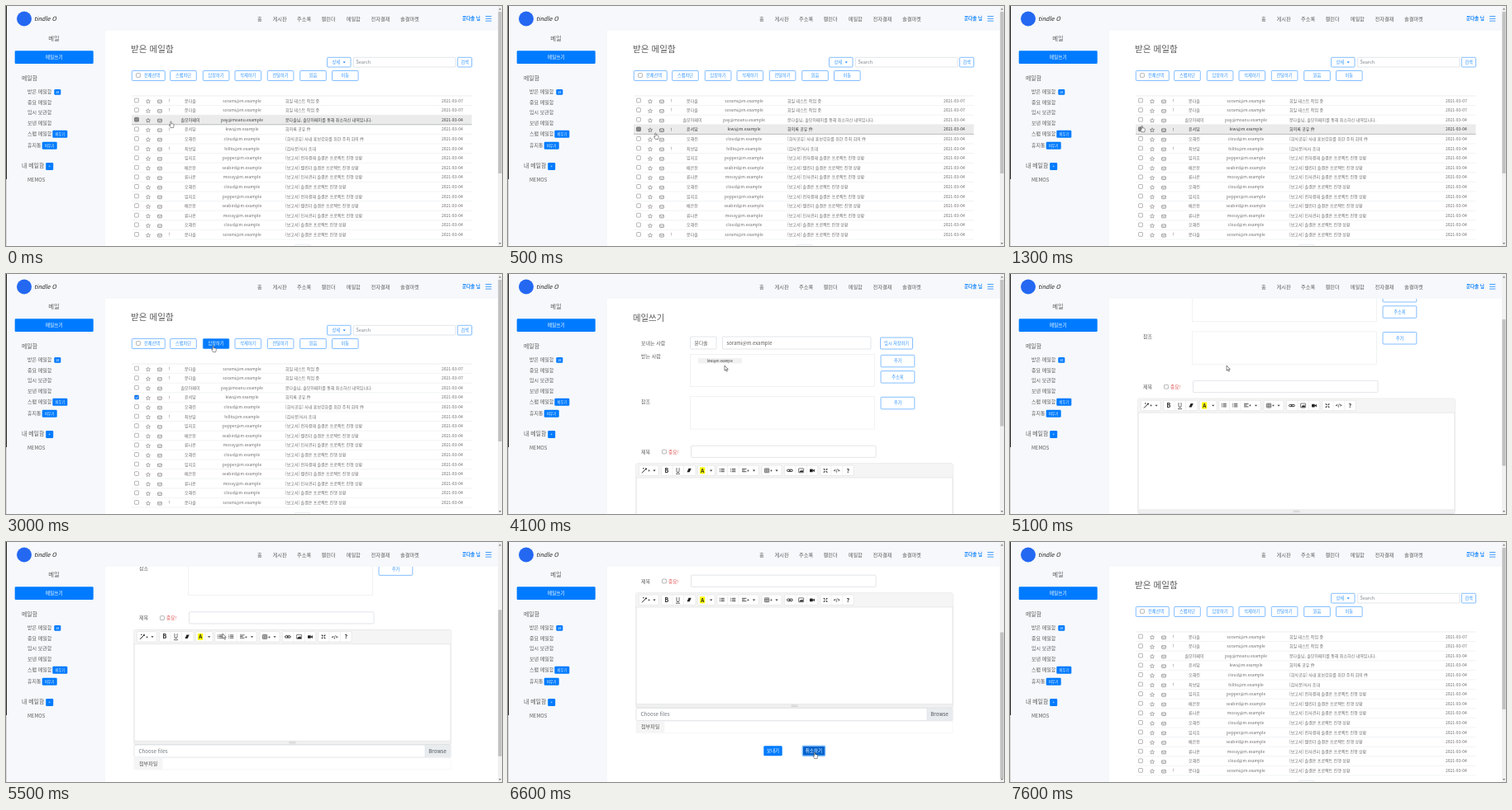
An HTML page for the animation above (7700 ms loop, 600 by 291 pixels).

```html
<!DOCTYPE html>
<html lang="ko">
<head>
<meta charset="utf-8">
<title>메일함</title>
<style>
html, body { margin: 0; width: 100%; height: 100%; overflow: hidden; background: #fff; }
svg { display: block; width: 100%; height: 100%; }
text { font-family: "Noto Sans CJK KR", "Noto Sans CJK", "Noto Sans", sans-serif; white-space: pre; }
</style>
</head>
<body>
<svg id="stage" viewBox="0 0 600 291" xmlns="http://www.w3.org/2000/svg"></svg>
<script>
const BLUE = '#007bff', SOFT_BLUE = '#2f93ff', INK = '#5c5c5c', ROW_INK = '#707070', PALE = '#f6f8fb';
const LOOP = 7700, STEP = 100;
const ROW_TOP = 109, ROW_H = 11.6;

// Drawing helpers; text is placed by its vertical centre.
const rect = (x, y, w, h, fill, extra = '') =>
  `<rect x="${x}" y="${y}" width="${w}" height="${h}" fill="${fill}" ${extra}/>`;
const frame = (x, y, w, h, stroke, fill = '#fff', r = 1.2) =>
  rect(x, y, w, h, fill, `stroke="${stroke}" stroke-width=".6" rx="${r}"`);
const text = (x, y, size, str, fill = INK, extra = '') =>
  `<text x="${x}" y="${y + size * 0.36}" font-size="${size}" fill="${fill}" ${extra}>${str}</text>`;
const mid = (x, y, size, str, fill = INK, extra = '') =>
  text(x, y, size, str, fill, `text-anchor="middle" ${extra}`);
const line = (d, stroke = '#333', w = 0.7, extra = '') =>
  `<path d="${d}" fill="none" stroke="${stroke}" stroke-width="${w}" ${extra}/>`;
const caret = (x, y, fill = '#333') => `<path d="M${x - 1.6} ${y - 0.7}h3.2l-1.6 1.8z" fill="${fill}"/>`;
const outlineButton = (x, y, w, h, label, size = 5.2, id = '') =>
  `<g id="${id}">${frame(x, y, w, h, SOFT_BLUE)}${mid(x + w / 2, y + h / 2, size, label, SOFT_BLUE)}</g>`;
const solidButton = (x, y, w, h, label, size, id = '') =>
  `<g id="${id}">${rect(x, y, w, h, BLUE, 'rx="1.3"')}${mid(x + w / 2, y + h / 2, size, label, '#fff')}</g>`;
const checkbox = (x, y) => frame(x - 2.4, y - 2.4, 4.8, 4.8, '#858585', '#fff', 0.7);

function star(x, y) {
  const points = Array.from({ length: 10 }, (_, i) => {
    const r = i % 2 ? 1.2 : 2.7, a = i * Math.PI / 5;
    return `${(x + r * Math.sin(a)).toFixed(2)},${(y - r * Math.cos(a)).toFixed(2)}`;
  });
  return `<polygon points="${points.join(' ')}" fill="none" stroke="#6a6a6a" stroke-width=".5"/>`;
}

const envelope = (x, y) => frame(x - 2.4, y - 1.8, 4.8, 3.7, '#6a6a6a', 'none', 0.5) +
  line(`M${x - 2.3} ${y - 1}l2.3 1.7 2.3-1.7`, '#6a6a6a', 0.5);

const me = ['문다솔', 'sorami@m.example'];
const report = topic => `[보고서] ${topic}솔결온 프로젝트 진행 상황`;
const test = [...me, '회일 테스트 작업 중'];
const reports = [
  ['임지호', 'pepper@m.example', report('전자결재 ')],
  ['배은찬', 'seabird@m.example', report('캘린더 ')],
  ['류나온', 'mossy@m.example', report('인사관리 ')],
  ['오해린', 'cloud@m.example', report('')]
];
const mails = [
  test, test,
  ['솔모아페이', 'pay@moanu.example', '문다솔님, 솔모아페이를 통해 취소하신 내역입니다.'],
  ['윤서담', 'kiwi@m.example', '회의록 공유 件'],
  ['오해린', 'cloud@m.example', '[회식공유] 사내 홍보강화를 위한 주최 회의 件'],
  ['최보담', 'hillto@m.example', '[감사문]식사 초대'],
  ...reports, ...reports,
  [...me, report('')]
];
const urgent = new Set([0, 1, 3, 5, 14]);

function mailRow([name, address, subject], i) {
  const y = ROW_TOP + ROW_H * (i + 0.5);
  return `<g class="row">${checkbox(158, y - 0.3)}${star(172, y + 0.9)}${envelope(186, y + 1)}` +
    (urgent.has(i) ? mid(197.3, y, 5.5, '!', ROW_INK) : '') +
    mid(223, y, 5, name, ROW_INK) + mid(285.5, y, 5, address, ROW_INK) + text(338, y, 5, subject, ROW_INK) +
    text(527, y, 5, i < 2 ? '2021-03-07' : '2021-03-04', ROW_INK) +
    line(`M152 ${y + ROW_H / 2}H563.5`, '#e3e6e9', 0.5) + '</g>';
}

function listPage() {
  const actions = [[198.7, '스팸차단'], [238.3, '답장하기', 'reply'], [277, '삭제하기'],
    [316.3, '전달하기'], [355.7, '읽음'], [394.5, '이동']];
  return text(151, 52.5, 10.6, '받은 메일함') +
    frame(388.5, 62.3, 28.5, 11.7, SOFT_BLUE) + text(394.5, 68.2, 5.2, '상세', SOFT_BLUE) + caret(409.2, 68.2, BLUE) +
    frame(420.3, 62.3, 123.5, 11.7, '#ced4da') + text(423.5, 68.2, 5.5, 'Search', '#7b838a') +
    outlineButton(546.3, 62.3, 17.2, 11.7, '검색') +
    frame(152.3, 78.5, 40, 12, SOFT_BLUE) + checkbox(160, 84) + text(167, 84.5, 5.2, '전체선택', SOFT_BLUE) +
    actions.map(([x, label, id]) => outlineButton(x, 78.5, 31.6, 12, label, 5.2, id)).join('') +
    line(`M152 ${ROW_TOP}H563.5`, '#dee2e6', 0.6) +
    rect(152, 0, 411.5, ROW_H, '#ebebeb', 'id="hover"') +
    mails.map(mailRow).join('') +
    `<g id="checked">${rect(154.6, 146.2, 6.8, 6.8, 'none', 'id="ring" stroke="#8abfff" stroke-width=".8" rx="1.2"')}` +
    rect(155.5, 147, 5.1, 5.1, '#0075ff', 'rx=".8"') + line('M156.5 149.6l1.2 1.2 2-2.4', '#fff', 0.8) + '</g>' +
    frame(349, 289.5, 19, 8, '#dee2e6');
}

function toolbar() {
  const y = 238.3;
  const groups = [[158.3, 24], [185.5, 41.5], [229.3, 21], [252.7, 50.5], [307, 24], [334.3, 40.5], [377.7, 40.5]];
  const dividers = [199, 212.5, 241, 265.5, 279, 348, 361.5, 391, 404.5];
  const bold = 'font-weight="700"';
  const bars = (x, ...widths) => widths.map((w, i) => `M${x} ${y - 2 + i * 1.7}h${w}`).join('');
  const bullets = x => line(bars(x - 1, 4.3, 4.3, 4.3) + bars(x - 2.8, 1, 1, 1), '#333', 0.8);
  const loop = x => rect(x, y - 1.2, 3.8, 2.4, 'none', 'rx="1.2" stroke="#222" stroke-width=".9"');
  const plus = x => mid(x, y, 4.7, '+', '#222', bold);
  return rect(155, 230, 383, 17, '#f5f5f5') + line('M155 247H538', '#ddd', 0.6) +
    groups.map(([x, w]) => frame(x, 232, w, 12.5, '#ddd')).join('') +
    line(dividers.map(x => `M${x} 232v12.5`).join(''), '#e3e3e3', 0.5) +
    line(`M162 ${y + 3}l4.6-4.6M167 ${y - 3}v2M166 ${y - 2}h2M163 ${y - 2.6}h1.6`, '#222', 1) +
    plus(170.7) + caret(177, y) +
    mid(192, y, 7, 'B', '#222', bold) + mid(205.5, y, 7, 'U', '#222', 'font-weight="500" text-decoration="underline"') +
    `<path d="M216.5 ${y + 2}l2-4.5h3.2l-2 4.5z" fill="#222"/>` +
    rect(232, y - 4, 6.3, 8, '#ff0') + mid(235.2, y, 6.3, 'A', '#222', bold) + caret(245.7, y) +
    bullets(258.5) + bullets(272) +
    line(bars(283, 5.5, 3.5, 5.5), '#333', 0.8) + plus(290.5) + caret(297.5, y) +
    frame(310.3, y - 2.5, 5.5, 5, '#333', '#fff', 0.4) +
    line(`M310.3 ${y - 0.8}h5.5m-5.5 1.7h5.5M312.2 ${y - 2.5}v5m1.8-5v5`, '#333', 0.5) +
    plus(318.5) + caret(325, y) + loop(337.5) + loop(340.5) +
    frame(351.6, y - 2.5, 6, 5, '#222', '#fff', 0.4) + `<path d="M352.2 ${y + 2}l1.8-2.4 1 1 1-1.8 1.2 3.2z" fill="#222"/>` +
    rect(365, y - 1.7, 3.8, 3.6, '#222', 'rx=".6"') + `<path d="M368.6 ${y}l2.3-1.8v3.8z" fill="#222"/>` +
    line(`M381.8 ${y - 2.2}l4.5 4.5m0-4.5l-4.5 4.5`, '#222', 1.1, 'stroke-dasharray="2.2 2"') +
    mid(397.7, y, 5, '&lt;/&gt;', '#222', bold) + mid(411.3, y, 7, '?', '#222', bold);
}

function composePage() {
  const field = '#ced4da', soft = '#e6e9ec';
  return text(151, 53, 10.4, '메일쓰기') +
    [['보내는 사람', 83.5], ['받는 사람', 100], ['참조', 155], ['제목', 215.5]]
      .map(([label, y]) => text(161, y, 6, label)).join('') +
    frame(220.5, 76, 31.5, 15, field) + text(225.5, 83.5, 5.9, me[0]) +
    frame(259.5, 76, 179.5, 15, field) + text(264.5, 83.5, 5.9, me[1]) +
    outlineButton(450.5, 77, 39, 14, '임시 저장하기') +
    frame(220.3, 97.3, 223, 39.3, soft, '#fff', 0) + rect(230, 102, 53, 6.6, '#f1f1f1', 'rx="1"') +
    mid(256.5, 105.2, 3.8, mails[3][1], '#333') +
    outlineButton(451, 98.3, 40.8, 14.5, '추가') + outlineButton(451, 117.6, 40.8, 14.5, '주소록') +
    frame(220.3, 148.7, 223, 39.3, soft, '#fff', 0) + outlineButton(451, 149.3, 40.8, 14.5, '추가') +
    checkbox(189, 215.5) + text(194, 215.5, 5.7, '중요!', '#e55353') +
    frame(221.5, 208.2, 223.5, 14.2, field) +
    frame(155, 230, 383, 138.8, '#c8c8c8') + toolbar() +
    rect(155.3, 364.5, 382.4, 4.2, '#f0f0f0') + line('M155 364.5H538', '#ddd', 0.5) +
    line('M342.5 366h8m-8 1.4h8', '#aaa', 0.4) +
    frame(155, 369.4, 383, 15, field) + text(160.5, 377, 6.2, 'Choose files', '#6c757d') +
    rect(507, 369.7, 30.7, 14.4, '#e9ecef') + line('M507 369.5v14.8', field, 0.5) +
    mid(522, 377, 6.2, 'Browse', '#495057') +
    frame(155, 385.3, 383, 14, '#f0f0f0', '#fff', 0) + rect(155, 385.3, 34.5, 14, '#f5f5f5') +
    text(161, 392.3, 6.1, '첨부파일') +
    solidButton(309.3, 415.3, 22.4, 12, '보내기', 5.5) + solidButton(356.3, 415.3, 27.3, 12, '취소하기', 5.5, 'cancel');
}

function chrome() {
  const nav = [[304, '홈'], [322.5, '게시판'], [352, '주소록'], [381.5, '캘린더'],
    [411.7, '메일함'], [441.5, '전자결재'], [477, '솔결마켓']];
  const folders = [[104, '받은 메일함'], [117, '중요 메일함'], [129, '임시 보관함'],
    [142, '보낸 메일함'], [155, '스팸 메일함'], [169, '휴지통']];
  return rect(0, 0, 595, 30, PALE) + rect(0, 30, 120, 261, PALE) +
    '<circle cx="22" cy="15.5" r="9" fill="#2468f2"/>' +
    text(34, 15.5, 7.2, 'tindle O', '#222', 'font-style="italic" font-weight="500"') +
    nav.map(([x, label]) => text(x, 15.3, 6.2, label)).join('') +
    text(552, 15.3, 5.5, me[0] + ' 님', BLUE, 'font-weight="700"') +
    line('M580 12.5h7.3m-7.3 2.8h7.3m-7.3 2.8h7.3', SOFT_BLUE, 0.9) +
    mid(58, 39, 7.4, '메일') + solidButton(10.7, 54.3, 95, 15.7, '메일쓰기', 5.7) +
    text(19, 87.5, 6.9, '메일함') + text(19, 194, 6.9, '내 메일함') +
    folders.map(([y, label]) => text(26, y, 6, label)).join('') + text(26, 211, 6, 'MEMOS') +
    solidButton(58.3, 101, 8, 6.7, '18', 4) + solidButton(56.3, 150.7, 18, 9, '비우기', 4.2) +
    solidButton(43.7, 164.7, 18, 9, '비우기', 4.2) + solidButton(48.2, 190, 9, 9, '+', 4.5) +
    rect(0, 0, 1, 210, '#222') + rect(0, 210, 1, 81, '#d8d8d8') +
    rect(595, 0, 5, 291, '#f1f1f1') + '<path d="M596 4.5l1.5-2 1.5 2zM596 287l1.5 2 1.5-2z" fill="#777"/>' +
    rect(595.4, 7, 4.2, 100, '#c1c1c1', 'id="thumb"');
}

const pointers =
  `<g id="cursor" stroke="#222" stroke-width=".55" fill="#fff" stroke-linejoin="round">
    <path id="arrow" d="M0 0V6.2L1.4 4.9 2.4 7.1 3.4 6.7 2.4 4.5H4.3Z"/>
    <path id="hand" transform="scale(.88)" d="M-.7 .5Q0-.5.7 .5V3L2 3.2 3.4 3.6Q4.3 3.8 4.2 4.8L3.5 8.6H-.3L-2.2 5.6Q-2.4 4.4-1.4 4.8L-.7 5.5Z"/>
  </g>`;

const stage = document.getElementById('stage');
stage.innerHTML = rect(0, 0, 600, 291, '#fff') + `<g id="list">${listPage()}</g><g id="compose">${composePage()}</g>` +
  chrome() + pointers;

const el = id => document.getElementById(id);
const show = (id, on) => el(id).setAttribute('display', on ? 'inline' : 'none');
const set = (node, attr, value) => node.setAttribute(attr, value);
const rows = [...document.querySelectorAll('.row')];
const replyBox = el('reply').querySelector('rect'), replyLabel = el('reply').querySelector('text');
const cancelBox = el('cancel').querySelector('rect');

// Keys are [time, ...values], joined by straight segments.
const cursorKeys = [[0, 199.5, 140], [400, 184, 158], [800, 162, 142], [1000, 160.5, 140], [1200, 160.5, 140],
  [1300, 159.7, 145.2], [1500, 159.5, 147], [2000, 159.5, 147], [2800, 250.7, 87], [3500, 250.7, 87],
  [4100, 262, 111], [5900, 262, 111], [6500, 371, 255], [6700, 371, 255], [6900, 367, 262]];
const scrollKeys = [[4300, 0], [5100, 78.8], [5900, 168]];

function sample(keys, t) {
  const next = keys.findIndex(k => k[0] > t);
  if (next === 0) return keys[0].slice(1);
  if (next < 0) return keys[keys.length - 1].slice(1);
  const a = keys[next - 1], b = keys[next], p = (t - a[0]) / (b[0] - a[0]);
  return a.slice(1).map((v, i) => v + (b[i + 1] - v) * p);
}

function render(time) {
  const t = Math.floor((time % LOOP) / STEP) * STEP;
  const composing = t >= 3500 && t < 6700;
  const [x, y] = sample(cursorKeys, t);
  const [scroll] = sample(scrollKeys, t);
  const present = t < 7000;

  show('list', !composing);
  show('compose', composing);
  set(el('compose'), 'transform', `translate(0 ${-scroll})`);
  set(el('thumb'), 'y', 7 + (composing ? scroll * 0.61 : 0));
  set(el('thumb'), 'height', composing ? 177.5 : 196);

  const row = Math.floor((y - ROW_TOP) / ROW_H);
  const hovering = present && !composing && row >= 0 && row < rows.length;
  show('hover', hovering);
  if (hovering) set(el('hover'), 'y', ROW_TOP + ROW_H * row);
  rows.forEach((g, i) => set(g, 'style', hovering && i === row ? 'filter: brightness(.55)' : ''));

  show('checked', t >= 1800 && t < 3500);
  show('ring', t >= 1900 && t < 2800);
  const lit = t < 2900 || t >= 3500 ? 0 : t < 3000 ? 0.6 : 1;
  set(replyBox, 'fill', lit ? BLUE : '#fff');
  set(replyBox, 'fill-opacity', lit || 1);
  set(replyLabel, 'fill', lit ? '#fff' : SOFT_BLUE);

  set(cancelBox, 'fill', t >= 6500 ? '#0062cc' : BLUE);
  set(cancelBox, 'stroke', t >= 6600 ? '#80bdff' : 'none');
  set(cancelBox, 'stroke-width', 1.4);

  const pointing = hovering || (!composing && y < 91) || (composing && t >= 6500);
  show('cursor', present);
  show('hand', pointing);
  show('arrow', !pointing);
  set(el('cursor'), 'transform', `translate(${x} ${y})`);
}

const start = performance.now();
function tick() {
  render(performance.now() - start);
  requestAnimationFrame(tick);
}
tick();
</script>
</body>
</html>
```
